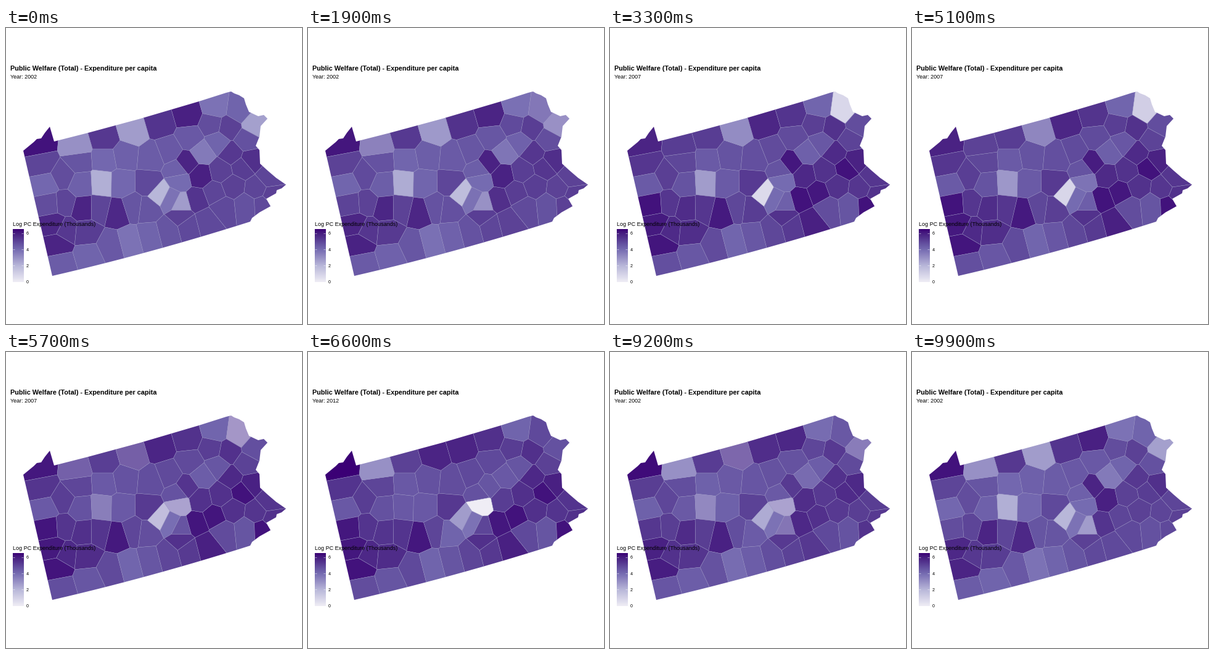
A matplotlib script that plays this animation: 480x480 px, repeating every 10000 ms.

```python
import numpy as np
import matplotlib.pyplot as plt
from matplotlib.animation import FuncAnimation
from matplotlib.collections import PolyCollection
from matplotlib.colors import to_rgb as hex_rgb
from matplotlib.patches import Polygon

SIZE, DPI = 480, 100
FRAMES, STEP = 100, 100
PX = 72 / DPI
YEARS = [2002, 2007, 2012]
FADES = [(16, 33, 26), (50, 66, 59), (83, 99, 92)]  # start, end, label switch

# sequential purple scale over 0 .. 6.5, blended in CIE Lab
STOPS = [0, 2, 4, 4.7, 5.5, 6.5]
SHADES = ["#efedf5", "#b8b7d9", "#756bb1", "#6451a0", "#51308b", "#3b0075"]
TO_XYZ = np.array([[0.4124, 0.3576, 0.1805],
                   [0.2126, 0.7152, 0.0722],
                   [0.0193, 0.1192, 0.9505]])
WHITE = TO_XYZ.sum(axis=1)


def to_lab(rgb):
    rgb = np.asarray(rgb, float)
    lin = np.where(rgb > 0.04045, ((rgb + 0.055) / 1.055) ** 2.4, rgb / 12.92)
    t = lin @ TO_XYZ.T / WHITE
    f = np.where(t > 0.008856, np.cbrt(t), 7.787 * t + 16 / 116)
    x, y, z = f[..., 0], f[..., 1], f[..., 2]
    return np.stack([116 * y - 16, 500 * (x - y), 200 * (y - z)], axis=-1)


def to_rgb(lab):
    y = (lab[..., 0] + 16) / 116
    f = np.stack([y + lab[..., 1] / 500, y, y - lab[..., 2] / 200], axis=-1)
    t = np.where(f > 0.2069, f ** 3, (f - 16 / 116) / 7.787)
    lin = np.clip((t * WHITE) @ np.linalg.inv(TO_XYZ).T, 0, 1)
    rgb = np.where(lin > 0.0031308, 1.055 * lin ** (1 / 2.4) - 0.055, 12.92 * lin)
    return np.clip(rgb, 0, 1)


STOP_LAB = to_lab([hex_rgb(c) for c in SHADES])


def scale_lab(v):
    return np.stack([np.interp(v, STOPS, STOP_LAB[:, k]) for k in range(3)], axis=-1)


seeds, values = [], []


def row(start, end, *levels):
    """Space counties evenly on a line; a lone level follows the usual growth."""
    for p, v in zip(np.linspace(start, end, len(levels)), levels):
        seeds.append(p)
        values.append(v if isinstance(v, tuple) else
                      (v, min(v + 0.35, 6.3), min(v + 0.4, 6.4)))


# west: columns from north to south
row((53, 188), (90, 383), (6.2, 5.8, 6.5), 5, 4.1, (4.8, 6.2, 6.1), 5.7, 5.8, 4.4)
row((91, 240), (97, 328), 4.8, 5, 5.3)
row((118, 215), (134, 370), 4.6, 4.3, (5.8, 5.6, 5.4), 5.2, 4.2)
row((160, 212), (151, 292), 4.1, (2.2, 2.7, 4.5), 5)
row((192, 206), (181, 299), 4.3, 4.1, 5.7)
row((236, 210), (229, 294), 4.4, 4.9, (4.6, 5.2, 4.2))
row((206, 291), (206, 291), 4.6)
# northern tier and southern border
row((115, 193), (340, 128), (3, 5.2, 3), (5.3, 5.2, 5.1), (2.7, 3.1, 5.8), 5.4,
    (5.9, 5.4, 5.5), 3.8)
row((170, 353), (326, 313), 4.5, 3.8, 4.2, 4.6, 4.9, (4.9, 5.9, 5.9))
# centre
row((264, 199), (334, 157), 4.5, 4.5, 4.8)
row((278, 231), (278, 231), 4.3)
row((250, 268), (284, 285), (2, 0.7, 2.7), (3.8, 4, 3.8), (2.7, 4.3, 5))
row((284, 306), (284, 306), 5.1)
row((309, 278), (367, 256), (5.4, 6.2, 6.1), (5, 6.1, 6.2), 5.1)
row((281, 247), (383, 225), (4, 4, 0), (5.9, 5.7, 5.2), 5.1, (5.2, 6.2, 6.2))
row((343, 184), (293, 219), 4.2, (3.6, 4.3, 4.5), (5.8, 6.1, 4.6))
# east
row((377, 133), (404, 157), (4.2, 0.8, 4.9), (2.6, 4.8, 4.7))
row((360, 162), (390, 183), 5.1, 4.7)
row((367, 204), (396, 214), 5.3, 5.5)
row((407, 261), (427, 243), 5, 5)
row((352, 292), (390, 288), (4.9, 4.8, 4.9), (4.7, 4.6, 4.6))
row((416, 287), (431, 271), (4.9, 6.2, 6.2), 5.1)


def halfplane(poly, normal, limit):
    """Keep the part of a convex polygon where p . normal <= limit."""
    out = []
    for a, b in zip(poly, poly[1:] + poly[:1]):
        da, db = a @ normal - limit, b @ normal - limit
        if da <= 0:
            out.append(a)
        if da * db < 0:
            out.append(a + (b - a) * da / (da - db))
    return out


def cell(p):
    """Region nearer to p than to any other seed."""
    poly = [np.array(c, float) for c in ((0, 0), (SIZE, 0), (SIZE, SIZE), (0, SIZE))]
    for q in seeds:
        if q is not p:
            poly = halfplane(poly, q - p, (q @ q - p @ p) / 2)
    return poly


NORTH = [(28, 199), (45, 185), (50, 180), (57, 179), (63, 170), (71, 160), (78, 184),
         (133, 170), (218, 147), (313, 119), (357, 105), (365, 103), (370, 106)]
EAST = [(378, 109), (386, 114), (389, 124), (394, 136), (409, 143), (418, 141),
        (424, 147), (413, 159), (411, 176), (405, 191), (411, 198), (412, 220),
        (424, 231), (438, 243), (454, 254), (447, 260), (439, 263), (438, 268),
        (422, 277), (429, 289), (411, 299), (399, 308)]
t = np.linspace(0, 1, 15)[:, None]
SOUTH = (np.array([396, 314]) * (1 - t) + np.array([75, 402]) * t
         + np.array([0, 14]) * t * (1 - t))

LABS = [scale_lab(v) for v in np.array(values).T]


def state(i):
    """Colours and year label at frame i."""
    lab, year = LABS[0], YEARS[0]
    for k, (start, end, switch) in enumerate(FADES):
        nxt = (k + 1) % 3
        if i > start:
            p = min(1, (i - start) / (end - start))
            lab = LABS[k] + (LABS[nxt] - LABS[k]) * p
        if i >= switch:
            year = YEARS[nxt]
    return to_rgb(lab), year


fig = plt.figure(figsize=(SIZE / DPI, SIZE / DPI), dpi=DPI, facecolor="white")
ax = fig.add_axes([0, 0, 1, 1])
ax.axis("off")


def label(x, y, s, px, **kw):
    return ax.text(x, y, s, fontsize=px * PX, family="Liberation Sans", zorder=5, **kw)


border = ax.add_patch(Polygon(np.vstack([NORTH, EAST, SOUTH]), fc="none", ec="none"))
counties = PolyCollection([cell(p) for p in seeds], edgecolors="#958fc0",
                          linewidths=0.4 * PX)
ax.add_collection(counties)
counties.set_clip_path(border)

label(7, 69, "Public Welfare (Total) - Expenditure per capita", 10.9, weight="bold")
subtitle = label(7, 82, "", 9)
label(11, 321, "Log PC Expenditure (Thousands)", 9)

# colour bar
LEFT, RIGHT, TOP, BOTTOM = 11, 28.3, 326, 412
ramp = to_rgb(scale_lab(np.linspace(6.5, 0, 172)))[:, None, :]
ax.imshow(ramp, extent=(LEFT, RIGHT, BOTTOM, TOP), aspect="auto",
          interpolation="bilinear", zorder=3)
for v in (0, 2, 4, 6):
    y = BOTTOM - 0.3 - v * 13.15
    for a in (LEFT, RIGHT - 3.4):
        ax.plot([a, a + 3.4], [y, y], color="white", lw=0.5 * PX, zorder=4,
                solid_capstyle="butt")
    label(32.8, y + 2.6, str(v), 7.2)
ax.set_xlim(0, SIZE)
ax.set_ylim(SIZE, 0)


def draw(i):
    colors, year = state(i)
    counties.set_facecolor(colors)
    subtitle.set_text(f"Year: {year}")
    return counties, subtitle


anim = FuncAnimation(fig, draw, frames=FRAMES, interval=STEP, repeat=True,
                     repeat_delay=0, blit=False)
plt.show()
```
